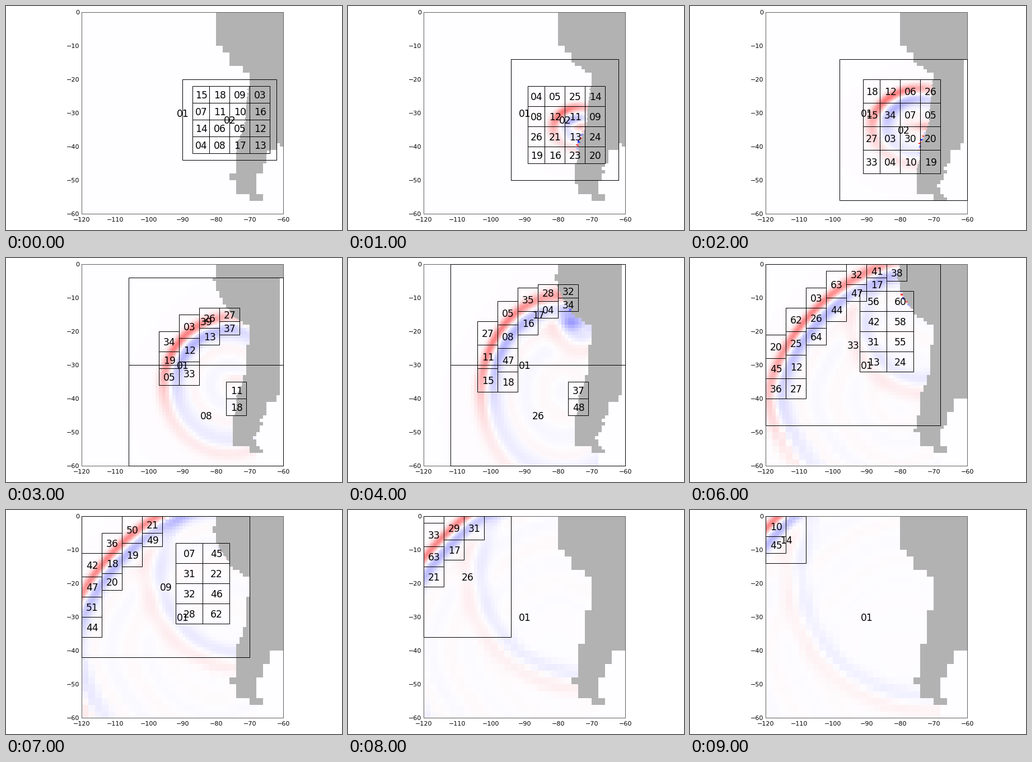
Write a matplotlib script that moves like this. It is 600 by 400 pixels and loops after 9.5 s.

```python
import random

import numpy as np
import matplotlib.pyplot as plt
from matplotlib.animation import FuncAnimation
from matplotlib.patches import Rectangle

STEPS, STEP_MS = 19, 500
OCEAN = np.array([254, 253, 255]) / 255
RED, BLUE = np.array([1, 0, 0]), np.array([0, 0, 1])
LAND = np.array([178, 178, 178]) / 255

# Degrees west and south are positive everywhere below.
axis = (np.arange(360) + 0.5) / 6
WEST, SOUTH = np.meshgrid(120 - axis, axis)


def bell(v, width):
    return np.exp(-(v / width) ** 2 / 2)


def even(v):
    return 2 * int(round(v / 2))


class Front:
    """The leading wave: a squashed ellipse growing around its centre."""

    def __init__(self, step):
        keys = [0, 4, 8, 12, 18]
        self.rx = np.interp(step, keys, [1, 14.2, 24.5, 39, 58.5])
        self.ry = np.interp(step, keys, [1, 11.3, 28.8, 40, 58])
        self.cx = np.interp(step, keys[:4], [73.5, 74, 78.3, 80])
        self.cy = np.interp(step, keys[:4], [35, 34, 38, 39.7])
        self.p = np.clip(2 - 0.18 * (step - 8), 1.62, 2)

    def offset(self, west, south):
        """Distance outward from the front, in degrees."""
        u = np.abs(west - self.cx) / self.rx
        v = np.abs(south - self.cy) / self.ry
        return ((u ** self.p + v ** self.p) ** (1 / self.p) - 1) * np.sqrt(self.rx * self.ry)

    def north(self, west, inset=0):
        """Latitude of the northern branch at a longitude."""
        u = min(1, abs(west - self.cx) / (self.rx - inset))
        return self.cy - (self.ry - inset) * (1 - u ** self.p) ** (1 / self.p)


def grid(xs, ys):
    return [(w, e, n, s) for n, s in zip(ys, ys[1:]) for w, e in zip(xs, xs[1:])]


def split(a, b, count):
    return [int(v) for v in np.ceil(np.linspace(a, b, count + 1))]


def middle_boxes(step):
    west = even(np.interp(step, [0, 1, 3, 10], [90, 94, 94, 120]))
    east = even(np.interp(step, [3, 4, 10, 11, 15, 16, 18], [62, 60, 60, 68, 70, 94, 108]))
    north = even(np.interp(step, [0, 1, 4, 5, 7, 8], [20, 14, 14, 4, 4, 0]))
    south = even(np.interp(step, [0, 1, 6, 8, 10, 16, 18], [44, 48, 60, 60, 54, 36, 14]))
    xs = [west, 90, east] if step in (9, 10) else [west, east]
    ys = [north, 30, south] if step in (6, 7, 8) else [north, south]
    return grid(xs, ys)


def fine_boxes(step):
    if step < 6:
        return grid(split(87 + step, 64 + step, 4),
                    split(22 - step // 4 * 2, 42 + 1.5 * step, 4))
    front = Front(step)
    boxes = []
    # Columns of boxes cover the crest and the trough behind it.
    west = min(120, int(np.ceil(front.cx + front.rx + 1)))
    while west > 76 and front.north(west) > 0:
        east = west - 6
        top = max(0, round(front.north(east) - 3.5))
        bottom = round(min(front.cy + 6, front.north(west, 5)))
        rows = int(np.ceil((bottom - top) / 7.5))
        boxes += grid([west, east], split(top, bottom, rows))
        west = east
    if 10 <= step <= 15:
        boxes += grid([92, 84, 76], split(8, 32, 4))
    if step <= 8:
        boxes += grid([77, 71], [35, 40, 45])
    return boxes


def build(step):
    pool = [f"{n:02d}" for n in range(3, min(65, 19 + 4 * step))]
    random.Random(step).shuffle(pool)

    def named(boxes):
        return [(*box, pool.pop()) for box in boxes]

    mid = middle_boxes(step)
    mid = [(*mid[0], "02")] if step < 6 else named(mid)
    return mid, named(fine_boxes(step))


scenes = [build(step) for step in range(STEPS)]


def land_edges(south):
    west = np.interp(south,
                     [0, 4, 7, 10, 13, 15.5, 17.5, 18.5, 24, 29, 33, 36.5, 39, 43, 46, 49, 53.5, 54.5],
                     [80, 80.8, 80, 78.7, 76.6, 75, 71.8, 70.3, 70.5, 71.2, 71.4, 72.6, 73.8,
                      74, 74.8, 75.3, 74.6, 70.3])
    east = np.interp(south, [39, 39.5, 40.6, 41.3, 44.5, 46, 47.5, 51.5, 54, 55],
                     [60.5, 62, 62.3, 64.8, 64.9, 66.7, 66.2, 68.7, 68, 66.2])
    return np.where(south < 56, west, 0), east


def wave(west, south, step):
    """Sea surface height, -1 to 1."""
    if step == 0:
        return np.zeros_like(west)

    def at(steps, values):
        return np.interp(step, steps, values)

    front = Front(step)
    s = front.offset(west, south)

    # The front is strongest to the north-west and broad in the south.
    angle = np.degrees(np.arctan2(front.cy - south, west - front.cx)) - 40
    beam = np.exp(-(angle / np.where(angle > 0, 60, 42)) ** 2)
    amp = 0.04 + 0.12 * np.exp(-step / 6) + 0.42 * beam
    wide = 1 + 0.8 * (1 - beam) * min(1, step / 8)
    z = amp * bell(s, wide)
    z -= (0.03 + 0.5 * amp) * bell(s + 3.7, 1.3 * wide)
    tail = np.where(s < -8, 0.05 * np.sin(0.55 * s) * np.exp((s + 8) / 25), 0)
    z += tail * np.exp(-step / 14)

    # Reflection from the bend of the coast.
    back = np.hypot(west - 72.5, south - 16.5) - (24 + 3.2 * (step - 14))
    echo = at([6, 8, 14, 18], [0, 0.1, 0.075, 0.05])
    z += echo * (0.8 * bell(back - 4.5, 1.8) - bell(back, 1.6))
    z -= at([5, 8, 10], [0, 0.3, 0]) * bell(west - 75.5, 2.2) * bell(south - 17.5, 1.6)
    z += at([0, 1, 4, 7], [0, 0.3, 0.25, 0]) * bell(west - 73, 2.5) * bell(south - 34, 0.9)
    return np.where(west > 68, z, 0)


def shore(gap, south, step):
    """Sharp run-up on the cells next to the fine coast."""
    centre = np.interp(step, [4, 8, 12], [38.5, 16, 10])
    amp = np.interp(step, [0, 1, 12, 14, 15], [0, 0.9, 0.9, 0.15, 0])
    return np.where(gap < 0.6, amp * bell(south - centre, 1.7) * np.sin(3 * south + step), 0)


def sea_image(step):
    level = np.ones(WEST.shape, int)
    for depth, boxes, pad in zip((2, 3), scenes[step], (1, 0)):
        for w, e, n, s, _ in boxes:
            level[(WEST < w + pad) & (WEST > e - pad)
                  & (SOUTH > n) & (SOUTH < s + pad)] = depth

    img = np.empty(WEST.shape + (3,))
    for depth, cell in ((1, 2), (2, 1), (3, 0.2)):
        here = level == depth
        w, s = ((np.floor(a[here] / cell) + 0.5) * cell for a in (WEST, SOUTH))
        left, right = land_edges(s)
        z = wave(w, s, step)
        if depth == 3:
            left = left + 0.12 * np.sin(5 * s) + 0.1 * np.sin(11 * s)
            z = z + shore(np.abs(w - left), s, step)
        z = np.clip(z, -1, 1)[:, None]
        rgb = OCEAN + np.abs(z) * (np.where(z > 0, RED, BLUE) - OCEAN)
        rgb[(w < left) & (w > right)] = LAND
        img[here] = rgb
    return img


# The axes sit a fraction of a pixel off the image's pixel grid.
DX, DY = 0.4, 0.6
fig = plt.figure(figsize=(6, 4), dpi=100, facecolor="white")
ax = fig.add_axes([(135 + DX) / 600, (28 + DY) / 400, 0.6, 0.9])
image = ax.imshow(sea_image(0), interpolation="nearest", aspect="auto",
                  extent=(-120 - DX / 6, -60 - DX / 6, -60 - DY / 6, -DY / 6))
ax.set(xlim=(-120, -60), ylim=(-60, 0),
       xticks=range(-120, -59, 10), yticks=range(-60, 1, 10))
ax.tick_params(axis="x", length=0, pad=4, labelsize=8)
ax.tick_params(axis="y", length=0, pad=3.2, labelsize=8)
plt.setp(ax.spines.values(), linewidth=0.72, color="#606060")
plt.setp(ax.get_xticklabels() + ax.get_yticklabels(), family="DejaVu Sans")
marks = []


def label(w, e, n, s, name):
    marks.append(ax.text(0.05 - (w + e) / 2, -0.25 - (n + s) / 2, name, size=12.3,
                         family="DejaVu Sans", ha="center", va="center", zorder=4))


def draw(step):
    image.set_data(sea_image(step))
    while marks:
        marks.pop().remove()
    label(120, 60, 0, 60, "01")
    mid, fine = scenes[step]
    for w, e, n, s, name in mid + fine:
        marks.append(ax.add_patch(Rectangle((-w, -s), w - e, s - n, fill=False, linewidth=0.72,
                                            edgecolor="black", clip_on=False, zorder=3)))
        label(w, e, n, s, name)
    return [image, *marks]


anim = FuncAnimation(fig, draw, frames=STEPS, interval=STEP_MS,
                     init_func=lambda: [image], repeat=True, repeat_delay=0)
plt.show()
```
